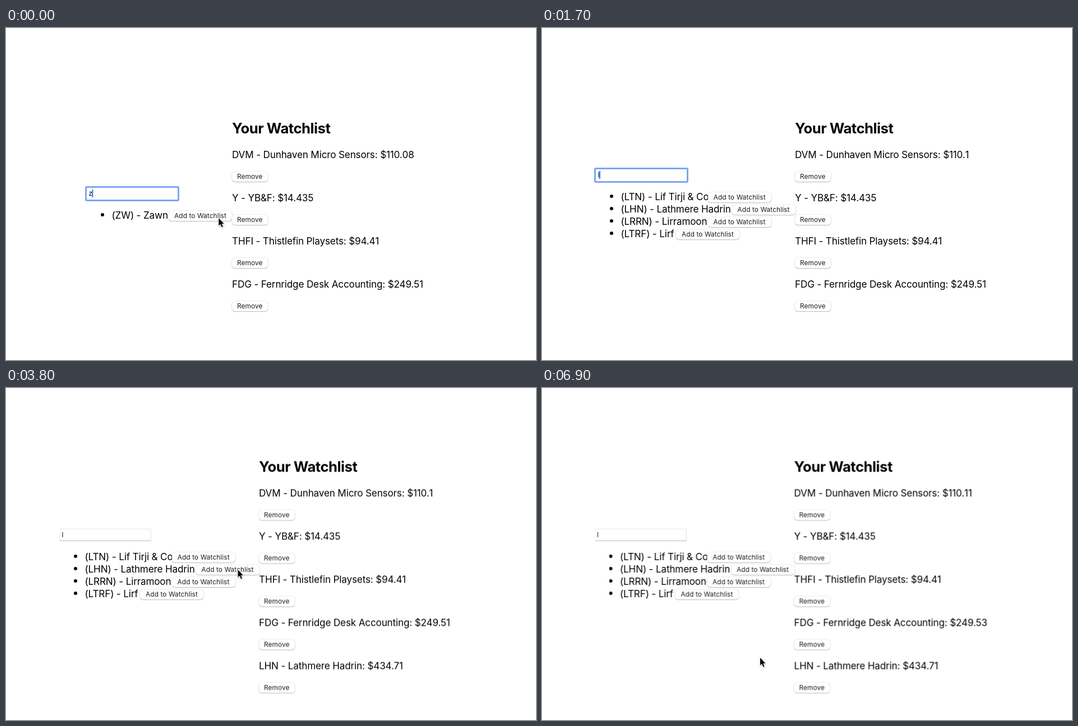
Write an HTML page that moves like this. It is 945 px wide and 592 px high and loops after 8000 ms.

```html
<!DOCTYPE html>
<html lang="en">
<head>
<meta charset="utf-8">
<title>Watchlist</title>
<style>
html, body { margin: 0; width: 100%; height: 100%; overflow: hidden; background: #fff; }
body {
  position: relative;
  font: 17.1px/22px Inter, "Liberation Sans", sans-serif;
  letter-spacing: -.15px;
  color: #000;
  white-space: nowrap;
}
h2, p, ul, li { margin: 0; padding: 0; list-style: none; }
.anim { animation: var(--k) 8s step-end infinite; }
.search, .watch, .cursor, .input, .ring, .typed, .caret, .btn, ul, h2, .row, .row p { position: absolute; }
.search, .watch, .cursor { left: 0; top: 0; }

/* search column */
.input {
  box-sizing: border-box; width: 162.5px; height: 22px; background: #fff;
  border: 1px solid #e6e6e6; border-bottom-color: #b9b9b9;
}
.ring {
  box-sizing: border-box; left: -3px; top: -2.5px; width: 168px; height: 27px;
  border: 3.5px solid #7da7f2; border-radius: 3px; background: #fff;
}
.typed { left: 3.5px; top: 0; font-size: 11.8px; letter-spacing: 0; }
.caret { left: 0; top: 4px; width: 2px; height: 14px; background: #2f74f0; }
ul { left: 44.5px; top: 38.5px; }
li { position: relative; height: 22px; }
li::before {
  content: ""; position: absolute; left: -19.8px; top: 7.6px;
  width: 6.4px; height: 6.4px; border-radius: 50%; background: #000;
}
li .btn { left: calc(var(--x) - 44.5px); top: 3.4px; width: 113px; }

/* watchlist column */
h2 { left: 0; top: 162.6px; font-size: 25.6px; line-height: 32px; letter-spacing: -.45px; }
.row { left: 0; top: calc(214.8px + var(--i) * 77px); }
.row p { left: 0; top: 0; }
.row .btn { left: -.3px; top: 41px; width: 64px; }
.alt { position: relative; }
.alt > span { position: absolute; left: 0; top: 0; line-height: normal; }

.btn {
  box-sizing: border-box; height: 18.4px; border-radius: 5px; background: #fff;
  box-shadow: 0 0 0 .5px rgba(0, 0, 0, .12), 0 .7px 1.2px rgba(0, 0, 0, .3);
  font-size: 11.8px; line-height: 18.4px; letter-spacing: .12px;
  text-align: center; color: #1c1c1c;
}
.cursor { overflow: visible; width: 1px; height: 1px; }
.arrow { filter: drop-shadow(0 1px 1px rgba(0, 0, 0, .3)); }

/* column layout */
@keyframes search {
  0% { transform: translate(144px, 284px); }
  15% { transform: translate(192px, 304px); }
  20% { transform: translate(96px, 251px); }
  86.25%, 100% { transform: translate(94.5px, 251px); }
}
@keyframes watch {
  0% { transform: translate(403px, 0); }
  15% { transform: translate(355px, 0); }
  20% { transform: translate(451px, 0); }
  47.5% { transform: translate(451px, -38.5px); }
  86.25%, 100% { transform: translate(449.5px, -38.5px); }
}

/* visibility windows */
@keyframes query-z { 0% { opacity: 1; } 15%, 100% { opacity: 0; } }
@keyframes query-l { 0% { opacity: 0; } 20%, 100% { opacity: 1; } }
@keyframes focus { 0% { opacity: 1; } 45%, 100% { opacity: 0; } }
@keyframes added { 0% { opacity: 0; } 47.5%, 100% { opacity: 1; } }
@keyframes tick-a { 0% { opacity: 1; } 20%, 100% { opacity: 0; } }
@keyframes tick-b { 0% { opacity: 0; } 20% { opacity: 1; } 77.5%, 100% { opacity: 0; } }
@keyframes tick-c { 0% { opacity: 0; } 77.5%, 100% { opacity: 1; } }
@keyframes tock-a { 0% { opacity: 1; } 86.25%, 100% { opacity: 0; } }
@keyframes tock-b { 0% { opacity: 0; } 86.25%, 100% { opacity: 1; } }

@keyframes caret {
  0% { transform: translateX(9.3px); opacity: 1; }
  6.25% { transform: translateX(9.3px); opacity: .5; }
  7.5% { transform: translateX(9.3px); opacity: 0; }
  10% { transform: translateX(9.3px); opacity: .33; }
  11.25% { transform: translateX(9.3px); opacity: .67; }
  12.5% { transform: translateX(9.3px); opacity: 1; }
  15% { transform: translateX(4px); opacity: 1; }
  20% { transform: translateX(6px); opacity: 1; }
  27.5% { transform: translateX(6px); opacity: .5; }
  28.75% { transform: translateX(6px); opacity: 0; }
  31.25% { transform: translateX(6px); opacity: .33; }
  32.5% { transform: translateX(6px); opacity: .67; }
  33.75% { transform: translateX(6px); opacity: 1; }
  40% { transform: translateX(6px); opacity: .5; }
  41.25%, 100% { transform: translateX(6px); opacity: 0; }
}

/* pointer */
@keyframes arrow {
  0% { transform: translate(379.3px, 339px); }
  1.25% { transform: translate(371px, 334.5px); }
  2.5% { transform: translate(365.5px, 331.5px); }
  31.25% { transform: translate(367px, 336px); }
  32.5% { transform: translate(372px, 353px); }
  33.75% { transform: translate(380px, 366px); }
  35% { transform: translate(392px, 366px); }
  36.25% { transform: translate(402px, 358px); }
  37.5% { transform: translate(409px, 349px); }
  38.75% { transform: translate(412.5px, 341px); }
  40% { transform: translate(413.5px, 336px); }
  41.25% { transform: translate(413.5px, 332px); }
  42.5% { transform: translate(413.5px, 327px); }
  43.75% { transform: translate(413.5px, 324px); }
  53.75% { transform: translate(570px, 408px); }
  67.5% { transform: translate(450px, 467px); }
  68.75%, 100% { transform: translate(389px, 481px); }
}
@keyframes arrow-on {
  0% { opacity: 1; }
  15% { opacity: 0; }
  31.25% { opacity: 1; }
  55% { opacity: 0; }
  67.5%, 100% { opacity: 1; }
}
@keyframes beam-on {
  0% { opacity: 0; }
  55% { opacity: 1; }
  67.5%, 100% { opacity: 0; }
}
</style>
</head>
<body>
<div class="search anim" style="--k:search">
  <div class="input"></div>
  <div class="ring anim" style="--k:focus"></div>
  <span class="typed anim" style="--k:query-z">z</span>
  <span class="typed anim" style="--k:query-l">l</span>
  <div class="caret anim" style="--k:caret"></div>
  <ul class="anim" style="--k:query-z">
    <li>(ZW) - Zawn<span class="btn" style="--x:146px">Add to Watchlist</span></li>
  </ul>
  <ul class="anim" style="--k:query-l">
    <li>(LTN) - Lif Tirji &amp; Co<span class="btn" style="--x:199.7px">Add to Watchlist</span></li>
    <li>(LHN) - Lathmere Hadrin<span class="btn" style="--x:242.5px">Add to Watchlist</span></li>
    <li>(LRRN) - Lirramoon<span class="btn" style="--x:199.5px">Add to Watchlist</span></li>
    <li>(LTRF) - Lirf<span class="btn" style="--x:143px">Add to Watchlist</span></li>
  </ul>
</div>

<div class="watch anim" style="--k:watch">
  <h2>Your Watchlist</h2>
  <div class="row" style="--i:0">
    <p>DVM - Dunhaven Micro Sensors: $110.<span class="alt"><span class="anim" style="--k:tick-a">08</span><span class="anim" style="--k:tick-b">1</span><span class="anim" style="--k:tick-c">11</span></span></p>
    <span class="btn">Remove</span>
  </div>
  <div class="row" style="--i:1">
    <p>Y - YB&amp;F: $14.435</p>
    <span class="btn">Remove</span>
  </div>
  <div class="row" style="--i:2">
    <p>THFI - Thistlefin Playsets: $94.41</p>
    <span class="btn">Remove</span>
  </div>
  <div class="row" style="--i:3">
    <p>FDG - Fernridge Desk Accounting: $249.5<span class="alt"><span class="anim" style="--k:tock-a">1</span><span class="anim" style="--k:tock-b">3</span></span></p>
    <span class="btn">Remove</span>
  </div>
  <div class="row anim" style="--i:4;--k:added">
    <p>LHN - Lathmere Hadrin: $434.71</p>
    <span class="btn">Remove</span>
  </div>
</div>

<svg class="cursor anim" style="--k:arrow">
  <g class="anim" style="--k:arrow-on">
    <path class="arrow" d="M0 0V13.6L3.1 10.7L5.4 16.2L7.6 15.2L5.3 9.9H9.4Z"
      fill="#000" stroke="#fff" stroke-width="1.8" paint-order="stroke" stroke-linejoin="round"/>
  </g>
</svg>
<svg class="cursor" style="transform:translate(602px,407px)">
  <defs>
    <path id="beam" d="M-4 .7Q-.4 .7 0 2.6Q.4 .7 4 .7M0 2.6V14.6M-4 16.5Q-.4 16.5 0 14.6Q.4 16.5 4 16.5M-2 11.2H2"/>
  </defs>
  <g class="anim" style="--k:beam-on" fill="none">
    <use href="#beam" stroke="#fff" stroke-width="2.6"/>
    <use href="#beam" stroke="#000" stroke-width="1.1"/>
  </g>
</svg>
</body>
</html>
```
